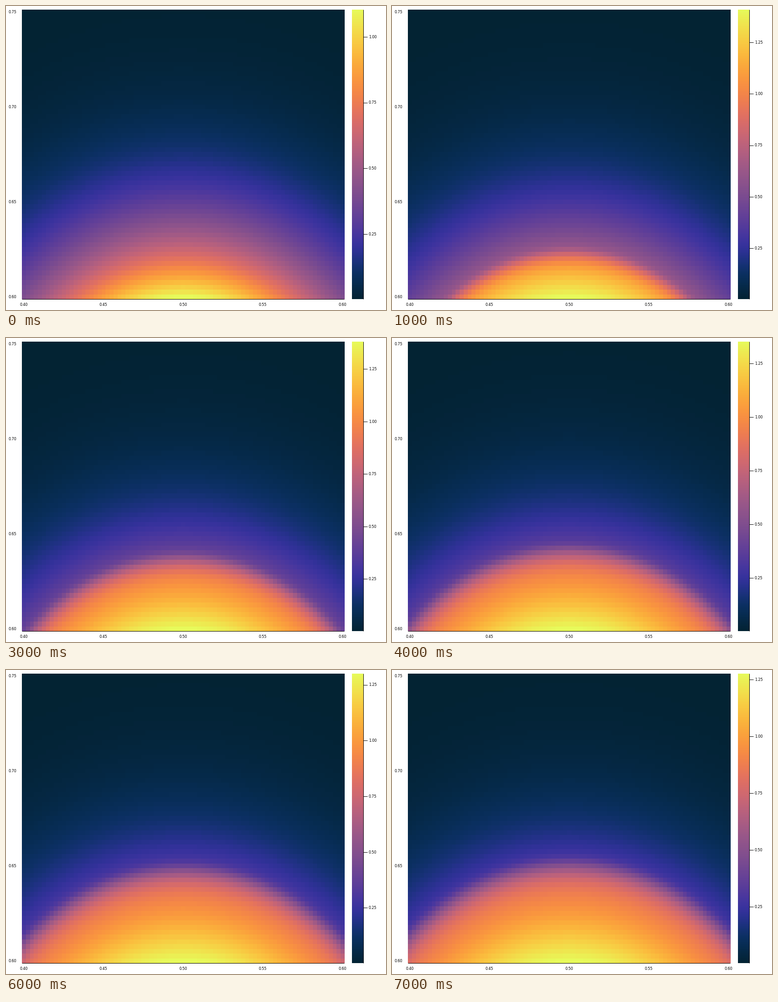
A matplotlib script that plays this animation: 837x669 px, repeating every 8 s.

```python
import numpy as np
import matplotlib.pyplot as plt
from matplotlib.animation import FuncAnimation
from matplotlib.colors import ListedColormap

W, H, DPI = 837, 669, 64
PT = 72 / DPI  # points per pixel
TOP, BOTTOM = 8, 645
LEFT, RIGHT = 34.6, 745.4
BAR_L, BAR_R = 762.5, 787.5

ANCHORS = [(3, 35, 51), (13, 48, 100), (53, 50, 155), (93, 62, 153),
           (126, 77, 143), (158, 89, 135), (193, 100, 121), (225, 113, 97),
           (246, 139, 69), (251, 173, 60), (246, 211, 70), (231, 250, 90)]


def smooth_cmap(anchors, n=256):
    """Catmull-Rom spline through evenly spaced colours."""
    p = np.array(anchors) / 255
    p = np.vstack([2 * p[0] - p[1], p, 2 * p[-1] - p[-2]])
    pos = np.linspace(0, len(anchors) - 1, n)
    i = np.minimum(pos.astype(int), len(anchors) - 2)
    f = (pos - i)[:, None]
    a, b, c, d = p[i], p[i + 1], p[i + 2], p[i + 3]
    rgb = b + f / 2 * (c - a + f * (2 * a - 5 * b + 4 * c - d
                                    + f * (3 * (b - c) + d - a)))
    return ListedColormap(np.clip(rgb, 0, 1))


x, y = np.meshgrid(np.linspace(0.4, 0.6, 81), np.linspace(0.6, 0.75, 61))
T0 = 3 * np.exp(-100 * ((x - 0.5) ** 2 + (y - 0.5) ** 2))

# Ignition delay and heat release as functions of the initial temperature
u = np.maximum(np.log(T0), -2)
DELAY = np.exp(-1.005 * u ** 2 - 4.1975 * u - 1.5706)
HEAT = 0.34 + 0.042 / np.exp(u)


def temperature(t):
    onset = 0.05 * np.logaddexp(0, (t / DELAY - 0.8) / 0.05)
    burnt = (1 - np.exp(-2.3 * onset)) * (1 - np.exp(-2.2 * t))
    hot = T0 + HEAT * burnt
    # radiative cooling, dT/dt ~ -T^4
    return (hot ** -3 + 0.0252 * np.maximum(t - DELAY, 0)) ** (-1 / 3)


fig = plt.figure(figsize=(W / DPI, H / DPI), dpi=DPI, facecolor="white")
ax = fig.add_axes([0, 0, 1, 1])
cmap = smooth_cmap(ANCHORS)
heat = ax.imshow(T0, cmap=cmap, origin="lower", aspect="auto",
                 interpolation="nearest", extent=(LEFT, RIGHT, BOTTOM, TOP))
ax.imshow(np.linspace(0, 1, 256)[:, None], cmap=cmap, origin="lower",
          aspect="auto", interpolation="nearest",
          extent=(BAR_L, BAR_R, BOTTOM, TOP))
ax.set_xlim(0, W)
ax.set_ylim(H, 0)
ax.axis("off")


def label(px, py, value, ha):
    return ax.text(px, py + 2.9, f"{value:.2f}", ha=ha, va="baseline",
                   fontsize=8 * PT, family="DejaVu Sans", color="black")


def line(xs, ys):
    return ax.plot(xs, ys, color="black", lw=PT, solid_capstyle="butt")[0]


for v in (0.40, 0.45, 0.50, 0.55, 0.60):
    label(39 + (v - 0.4) * 3510, 656.8, v, "center")
for v in (0.60, 0.65, 0.70, 0.75):
    label(23, 640.3 - (v - 0.6) * 4183, v, "right")
line([35, 745.5], [645, 645])
line([787.5, 787.5], [TOP, BOTTOM])

ticks = [(v, line([787.5, 796.5], [0, 0]), label(799, 0, v, "left"))
         for v in (0.25, 0.50, 0.75, 1.00, 1.25)]


def draw(i):
    field = temperature(i)
    lo, hi = field.min(), field.max()
    heat.set_data(field)
    heat.set_clim(lo, hi)
    for v, mark, text in ticks:
        py = BOTTOM - (v - lo) / (hi - lo) * (BOTTOM - TOP)
        mark.set_ydata([py, py])
        text.set_y(py + 2.9)
        mark.set_visible(v <= hi)
        text.set_visible(v <= hi)
    return [heat] + [a for _, *pair in ticks for a in pair]


anim = FuncAnimation(fig, draw, frames=8, interval=1000, repeat=True,
                     repeat_delay=0, blit=False)
plt.show()
```
